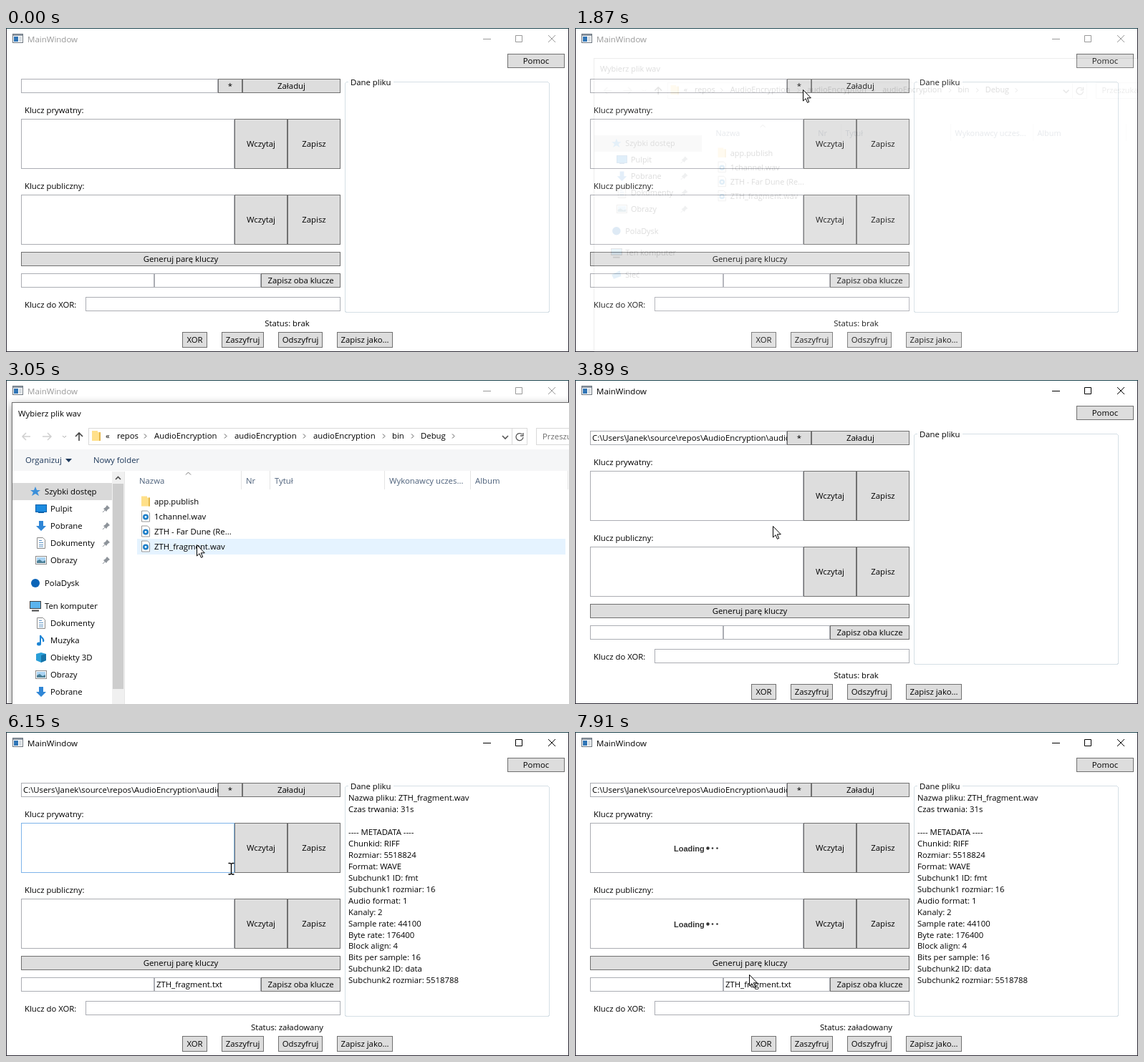
Recreate the animation shown at these times as an HTML page. Size 786 by 453 pixels, loop 7.99 s.

```html
<!DOCTYPE html>
<html lang="pl">
<head>
<meta charset="utf-8">
<title>MainWindow</title>
<style>
  html, body { margin: 0; width: 100%; height: 100%; overflow: hidden; background: #fff; }
  svg { display: block; }
  text { font: 11.35px "Open Sans", "Noto Sans", sans-serif; fill: #000; white-space: pre; }
  rect { shape-rendering: crispEdges; }
  .title { font-size: 11.5px; }
  .load { font: bold 11px "Liberation Sans", Arial, sans-serif; fill: #333; }
  .head { fill: #4c607a; }
  .tool { fill: #1e395b; }
  .mid { text-anchor: middle; }
  .dim { fill: #6d6d6d; }
</style>
</head>
<body>
<svg id="stage" width="786" height="453" viewBox="0 0 786 453"></svg>
<script>
const LOOP = 7990;

// Bursts of screen updates: first, last, count
const BURSTS = [
  [390, 1180, 11], [1260, 2030, 11], [2100, 2880, 11], [2970, 3750, 11],
  [3830, 3830, 1], [3890, 4600, 10], [4670, 4830, 3], [4980, 5370, 6],
  [5920, 6530, 9], [6830, 6830, 1], [7080, 7840, 11], [7910, 7910, 1]
];

// Pointer: time, x, y
const POINTER = [
  [390, 648, 414], [800, 490, 262], [1180, 336, 136], [1340, 320, 95],
  [1420, 318, 86], [2330, 318, 86], [2600, 300, 150], [2880, 267, 226],
  [2970, 266, 230], [3600, 266, 230], [3750, 268, 236], [3830, 271, 226],
  [3890, 276, 204], [4140, 307, 174], [4600, 401, 98], [4830, 402, 91],
  [4980, 403, 85], [5060, 404, 80], [5840, 404, 80], [6148, 314, 191],
  [6530, 247, 315], [6760, 247, 315], [6830, 248, 317], [7500, 248, 317],
  [7840, 243, 339]
];

// Dialog: time, opacity, scale
const DIALOG = [
  [1800, 0, .94], [1876, .13, .957], [1953, .7, .988], [2030, .97, 1],
  [2100, 1, 1], [3360, 1, 1], [3440, .6, .975], [3520, .15, .95], [3595, 0, .94]
];

const PRESSES = [[1490, 1640], [5130, 5280], [7080, 7230]];
const MODAL = [1790, 3430], PICKED = 3590, LOADED = 5290, GENERATING = 7305;

const within = (t, [a, b]) => t >= a && t < b;

function rect(x, y, w, h, fill, stroke, more = '') {
  const d = stroke ? .5 : 0;
  return `<rect x="${x + d}" y="${y + d}" width="${w - 2 * d}" height="${h - 2 * d}" fill="${fill}" stroke="${stroke || 'none'}" ${more}/>`;
}
// y is the middle of the capitals
const text = (x, y, s, cls = '', more = '') =>
  `<text x="${x}" y="${y + 4}" class="${cls}" ${more}>${s}</text>`;
const path = (d, stroke, width = 1, fill = 'none') =>
  `<path d="${d}" stroke="${stroke}" stroke-width="${width}" fill="${fill}"/>`;
const at = (x, y, s) => `<g transform="translate(${x} ${y})">${s}</g>`;

const button = (x, y, w, h, label) =>
  rect(x, y, w, h, '#ddd', '#707070', 'class="btn"') + text(x + w / 2, y + h / 2, label, 'mid');
const box = (x, y, w, h) => rect(x, y, w, h, '#fff', '#abadb3', 'class="box"');

const ICON = {
  star: path('M0-7 2-2 7-2 3 1 5 6 0 3-5 6-3 1-7-2-2-2Z', 'none', 0, '#3b8fd9'),
  screen: rect(-8, -6, 16, 11, '#1b8be0', '#0b5fa8') + rect(-4, 5, 8, 1, '#0b5fa8'),
  down: path('M-3-7H3V0H7L0 7-7 0H-3Z', 'none', 0, '#2f86d6'),
  page: path('M-5.5-7.5H2.5L5.5-4.5V7.5H-5.5Z', '#8a8a8a', 1, '#fff') +
    path('M-3-3.5H1M-3-.5H3M-3 2.5H3M-3 5H3', '#5c93c4'),
  image: rect(-8, -6, 16, 12, '#fff', '#8a8a8a') + rect(-6, -4, 12, 8, '#a9d3f2') +
    path('M-6 4V1L-2-1 2 2 6 0V4Z', 'none', 0, '#4b7f96'),
  cloud: '<circle r="6" fill="#0a64b8"/>',
  pc: rect(-8, -7, 16, 11, '#5bb4ee', '#444') + path('M-5 6.5H5', '#444', 2),
  note: path('M-1 5V-7C0-3 5-3 3 2', '#1c84d4', 2) + '<ellipse cx="-3" cy="5" rx="3" ry="2.5" fill="#1c84d4"/>',
  cube: path('M-7-5 0-7 7-5V4L0 7-7 4Z', 'none', 0, '#2a9fd8') + path('M0-3 7-5V4L0 7Z', 'none', 0, '#1673a8'),
  net: path('M-7 0 5-6 7 2-4 6Z', 'none', 0, '#3493d8'),
  folder: path('M-6-7H2V-5H6V7H-6Z', 'none', 0, '#ffe08a') + path('M5-5V7', '#e3b64b', 2),
  wav: path('M-5.5-7.5H2.5L5.5-4.5V7.5H-5.5Z', '#999', 1, '#fff') +
    '<circle cy="1" r="4" fill="#1f7fc8"/><circle cy="1" r="1.4" fill="#fff"/>',
  pin: path('M1-5 5-1 2 1 0 4-4 0-1-2Z', 'none', 0, '#8d939a') + path('M-2 2-5 5', '#8d939a')
};
const icon = (name, x, y) => at(x, y, ICON[name]);

function mainWindow() {
  const keyRow = y => box(21, y, 298, 70) + button(319, y, 74, 70, 'Wczytaj') + button(393, y, 74, 70, 'Zapisz');
  const info = ['Nazwa pliku: ZTH_fragment.wav', 'Czas trwania: 31s', '', '---- METADATA ----',
    'Chunkid: RIFF', 'Rozmiar: 5518824', 'Format: WAVE', 'Subchunk1 ID: fmt', 'Subchunk1 rozmiar: 16',
    'Audio format: 1', 'Kanaly: 2', 'Sample rate: 44100', 'Byte rate: 176400', 'Block align: 4',
    'Bits per sample: 16', 'Subchunk2 ID: data', 'Subchunk2 rozmiar: 5518788'];
  const loading = y => text(138, y, 'Loading', 'load') +
    [0, 1, 2].map(i => `<circle class="dot" cx="${185.5 + i * 6.5}" cy="${y}" r="1.3" fill="#333"/>`).join('');
  return rect(0, 0, 786, 453, '#2d2a35') + rect(0, 0, 786, 1, '#1d4650') + rect(1, 1, 784, 451, '#fff') +
    rect(9, 8, 15, 13, '#fff', '#6d7680') + rect(10, 9, 13, 2, '#8f9aa5') +
    rect(11, 12, 6, 7, '#2f74b5') + rect(18, 12, 4, 7, '#d5dbe0') +
    text(30, 16, 'MainWindow', 'title', 'id="caption"') +
    '<g id="controls" fill="none" stroke="#999"><path d="M666 15.5H677M711.5 10.5H720.5V19.5H711.5ZM757 10 767 20M767 10 757 20"/></g>' +
    button(700, 36, 80, 20, 'Pomoc') +
    box(21, 71, 275, 20) +
    text(24, 81, 'C:\\Users\\Janek\\source\\repos\\AudioEncryption\\audioE', '', 'id="file"') +
    button(296, 71, 34, 20, '*') + button(330, 71, 137, 20, 'Załaduj') +
    text(26, 115, 'Klucz prywatny:') + keyRow(127) +
    text(26, 221, 'Klucz publiczny:') + keyRow(233) +
    button(21, 313, 446, 20, 'Generuj parę kluczy') +
    box(21, 343, 186, 20) + box(207, 343, 149, 20) + button(356, 343, 111, 20, 'Zapisz oba klucze') +
    text(26, 387, 'Klucz do XOR:') + box(111, 376, 356, 20) +
    '<rect x="473.5" y="75.5" width="285" height="322" rx="3" fill="none" stroke="#d5dfe5"/>' +
    rect(478, 74, 63, 4, '#fff') + text(481, 76, 'Dane pliku') +
    text(392.5, 413, '', 'mid', 'id="status"') +
    button(246, 425, 35, 22, 'XOR') + button(301, 425, 59, 22, 'Zaszyfruj') +
    button(380, 425, 62, 22, 'Odszyfruj') + button(462, 425, 78, 22, 'Zapisz jako...') +
    `<g id="info">${info.map((s, i) => text(478, 92 + i * 15.96, s)).join('')}${text(210, 353, 'ZTH_fragment.txt')}</g>` +
    `<g id="loading">${loading(162.5)}${loading(268.5)}</g>`;
}

function dialog() {
  const side = (name, label, y, sub, pinned) =>
    icon(name, sub ? 49 : 41, y) + text(sub ? 62 : 54, y, label) + (pinned ? icon('pin', 140, y) : '');
  const crumbs = [[155, 'repos', 195], [207, 'AudioEncryption', 307], [319, 'audioEncryption', 417],
    [429, 'audioEncryption', 528], [539, 'bin', 568], [579, 'Debug', 625]];
  const files = ['app.publish', '1channel.wav', 'ZTH - Far Dune (Re...', 'ZTH_fragment.wav'];
  const heads = [[186, 'Nazwa', 328], [335, 'Nr', 368], [375, 'Tytuł', 528],
    [535, 'Wykonawcy uczes...', 648], [655, 'Album', 784]];
  return '<rect id="shadow" x="8" y="34" width="850" height="496" fill="#000" opacity=".4" filter="url(#blur)"/>' +
    rect(8, 31, 852, 497, '#fff', '#6e6e6e') + text(17, 47, 'Wybierz plik wav') +
    path('M34 79H23M28 74 23 79 28 84M51 79H63M58 74 63 79 58 84', '#d0d0d0', 1.5) +
    path('M79 78 81.500 80.500 84 78', '#aaa') + path('M102 85V74M97 79 102 74 107 79', '#444', 1.6) +
    rect(115, 67, 613, 24, '#fff', '#d9d9d9') + rect(706, 68, 1, 22, '#d9d9d9') +
    path('M693 78 697 82 701 78', '#555', 1.6) +
    path('M720.500 76A5 5 0 1 0 722 80M722 74V78H718', '#555', 1.3) +
    icon('folder', 126, 78) + text(139, 78, '«') +
    `<g id="crumb">${rect(315, 68, 110, 22, '#e5f3ff', '#cce8ff')}${rect(411, 68, 1, 22, '#cce8ff')}</g>` +
    crumbs.map(([x, s, c]) => text(x, 78, s) + path(`M${c - 2} 75.5 ${c + 1} 78.500 ${c - 2} 81.5`, '#555')).join('') +
    rect(740, 67, 110, 24, '#fff', '#d9d9d9') + text(749, 79, 'Przeszukaj: Debug', 'dim') +
    heads.map(([x, s, line]) => text(x, 141, s, 'head') + rect(line, 127, 1, 26, '#e5e5e5')).join('') +
    path('M251 132.500 254.500 129 258 132.500', '#777') +
    rect(183, 222, 598, 22, '#e5f3ff', '', 'id="row"') +
    files.map((s, i) => icon(i ? 'wav' : 'folder', 195, 169.5 + i * 21) + text(207, 170 + i * 21, s)).join('') +
    rect(9, 144, 156, 24, '#d9d9d9') + side('star', 'Szybki dostęp', 156) +
    side('screen', 'Pulpit', 180, 1, 1) + side('down', 'Pobrane', 204, 1, 1) +
    side('page', 'Dokumenty', 228, 1, 1) + side('image', 'Obrazy', 252, 1, 1) +
    side('cloud', 'PolaDysk', 284) + side('pc', 'Ten komputer', 316) +
    `<g id="early">${side('net', 'Sieć', 348)}</g>` +
    '<g id="late">' + rect(9, 97, 850, 30, '#f5f6f7') +
    text(27, 112, 'Organizuj', 'tool') + path('M83 110H92L87.500 115Z', 'none', 0, '#1e395b') +
    text(122, 112, 'Nowy folder', 'tool') +
    side('page', 'Dokumenty', 340, 1) + side('note', 'Muzyka', 364, 1) + side('cube', 'Obiekty 3D', 388, 1) +
    side('image', 'Obrazy', 412, 1) + side('down', 'Pobrane', 436, 1) +
    rect(148, 128, 17, 330, '#f0f0f0') + rect(149, 145, 15, 287, '#cdcdcd') +
    path('M153 139 156.500 135.500 160 139', '#505050', 1.6) + rect(165, 128, 1, 330, '#e5e5e5') + '</g>';
}

const stage = document.getElementById('stage');
stage.innerHTML = '<defs><filter id="blur" x="-10%" y="-10%" width="120%" height="120%"><feGaussianBlur stdDeviation="6"/></filter></defs>' +
  mainWindow() + `<g id="dialog">${dialog()}</g>` +
  '<g id="pointer">' +
  '<path id="arrow" d="M.5.5V16L4 12.700 6.500 18.300 8.700 17.300 6.300 11.800H11.300Z" fill="#fff" stroke="#000"/>' +
  '<path id="beam" d="M-3.500-7.500H-1L.5-6.500 2-7.500H4.500M.5-6.500V7M-3.500 8H-1L.5 7 2 8H4.500" fill="none" stroke="#000" stroke-width="1.300"/></g>';

const $ = id => document.getElementById(id);
const show = (id, on) => $(id).setAttribute('visibility', on ? 'inherit' : 'hidden');
const setAll = (el, attrs) => { for (const k in attrs) el.setAttribute(k, attrs[k]); };
const dots = [...document.querySelectorAll('.dot')];
const targets = [...document.querySelectorAll('.btn, .box')].map(el => {
  const n = k => +el.getAttribute(k);
  return { el, isBox: el.classList.contains('box'), x: n('x') - .5, y: n('y') - .5, w: n('width') + 1, h: n('height') + 1 };
});

// Time of the latest screen update
function snap(t) {
  let last = 0;
  for (const [a, b, n] of BURSTS) {
    if (t < a) break;
    const step = n > 1 ? (b - a) / (n - 1) : 1;
    last = a + Math.min(n - 1, Math.floor((t - a) / step + .1)) * step;
  }
  return last;
}

function track(keys, t) {
  if (t <= keys[0][0]) return keys[0].slice(1);
  const i = keys.findIndex(k => k[0] > t);
  if (i < 0) return keys[keys.length - 1].slice(1);
  const a = keys[i - 1], b = keys[i], p = (t - a[0]) / (b[0] - a[0]);
  return a.slice(1).map((v, j) => v + (b[j + 1] - v) * p);
}

function draw(now) {
  const t = snap(now);
  const [x, y] = track(POINTER, t).map(Math.round);
  const modal = within(t, MODAL), pressed = PRESSES.some(p => within(t, p));
  const active = within(t, [1490, MODAL[0]]) || t >= MODAL[1];

  let beam = false;
  for (const o of targets) {
    const over = t >= 390 && !modal && x >= o.x && x < o.x + o.w && y >= o.y && y < o.y + o.h;
    if (o.isBox) {
      beam = beam || over;
      o.el.setAttribute('stroke', over ? '#7eb4ea' : '#abadb3');
    } else {
      setAll(o.el, !over ? { fill: '#ddd', stroke: '#707070' }
        : pressed ? { fill: '#c4e5f6', stroke: '#2c628b' }
        : { fill: '#bee6fd', stroke: '#3c7fb1' });
    }
  }

  $('caption').style.fill = active ? '#000' : '#999';
  $('controls').setAttribute('stroke', active ? '#000' : '#999');
  $('status').textContent = t >= LOADED ? 'Status: załadowany' : 'Status: brak';
  show('file', t >= PICKED);
  show('info', t >= LOADED);
  show('loading', t >= GENERATING);
  dots.forEach((d, i) => {
    const wave = Math.cos(2 * Math.PI * ((t - 7910) / 480 - i % 3 / 3));
    d.setAttribute('r', 1.3 + .9 * Math.max(0, wave));
  });

  const [alpha, scale] = track(DIALOG, t);
  show('dialog', alpha > .001);
  setAll($('dialog'), {
    opacity: alpha,
    transform: `translate(433 279) scale(${scale}) translate(-433 -279)`
  });
  const ready = t >= 2100;
  show('shadow', ready);
  show('late', ready);
  show('early', !ready);
  show('crumb', ready && y >= 68 && y < 90 && x >= 315 && x < 425);
  const row = Math.floor((y - 159) / 21), chosen = t >= 3120;
  show('row', ready && row >= 0 && row < 4 && x >= 183);
  setAll($('row'), { y: 159 + row * 21, fill: chosen ? '#cce8ff' : '#e5f3ff' });

  show('pointer', t >= 390);
  $('pointer').setAttribute('transform', `translate(${x} ${y})`);
  show('arrow', !beam);
  show('beam', beam);
}

const start = performance.now();
function tick() {
  draw((performance.now() - start) % LOOP);
  requestAnimationFrame(tick);
}
tick();
</script>
</body>
</html>
```
